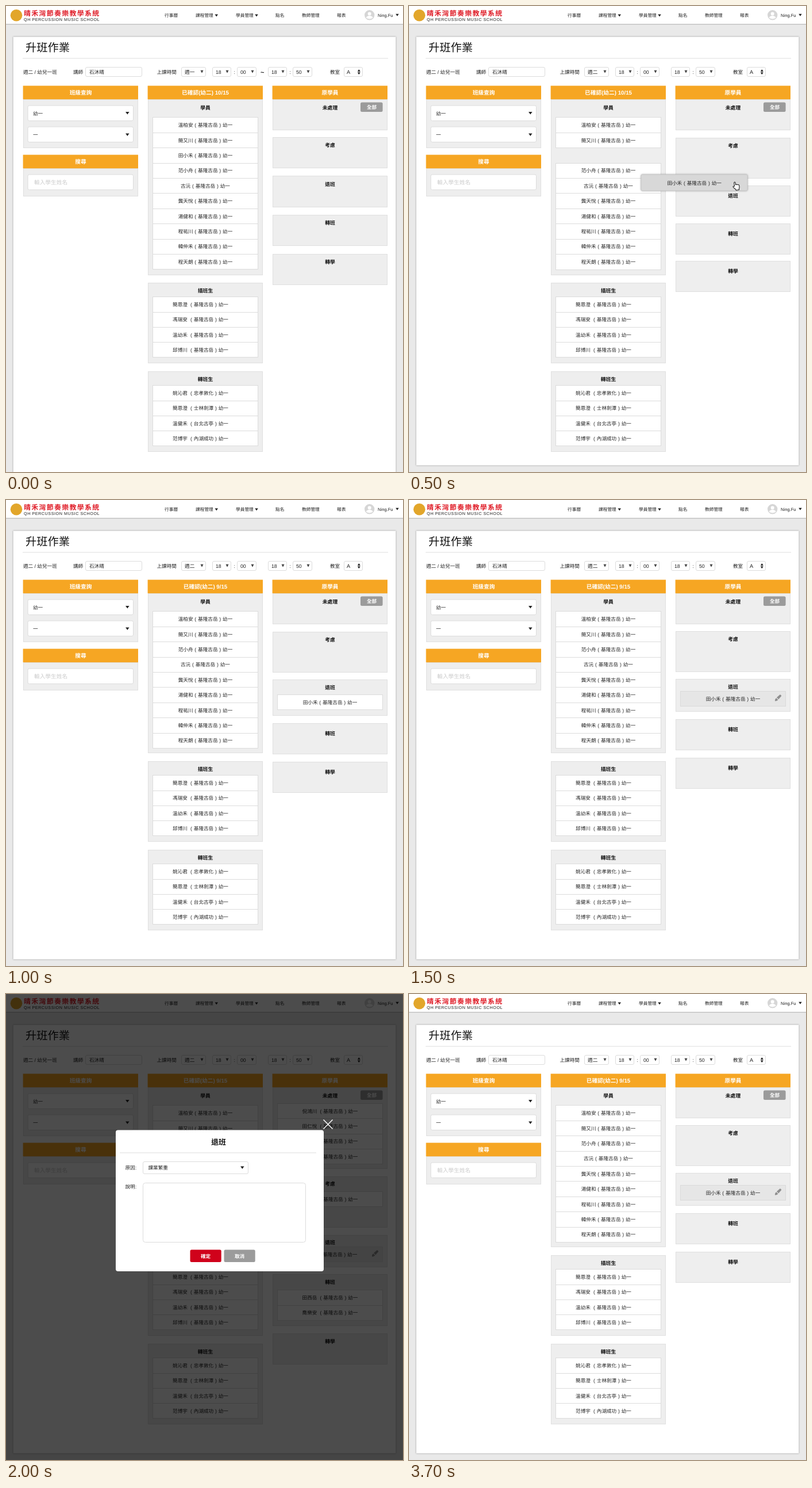
Animation of 691 by 810 pixels, one loop 4500 ms. Source, as an HTML page:

```html
<!DOCTYPE html>
<html lang="zh-TW">
<head>
<meta charset="utf-8">
<title>升班作業</title>
<style>
html, body { margin: 0; width: 100%; height: 100%; overflow: hidden; background: #e9e9e9; }
svg { display: block; width: 100vw; height: 100vh; }
text { font-family: "Liberation Sans", "Noto Sans CJK TC", "Noto Sans CJK", sans-serif; text-rendering: geometricPrecision; white-space: pre; }
.soft { filter: drop-shadow(0 0 1px rgba(0,0,0,.45)); }
.lift { filter: drop-shadow(0 .5px 1.5px rgba(0,0,0,.3)); }
</style>
</head>
<body>
<svg id="stage" viewBox="0 0 691 810" preserveAspectRatio="none"></svg>
<script>
const INK = '#222', LINE = '#dcdcdc', PANEL = '#eee', ORANGE = '#f6a623', GREY = '#9b9b9b';
const COLS = [30, 247, 464];
const BRANCH = '基隆古岳';

// Text is placed by its vertical centre.
function text(x, cy, s, o = {}) {
  const { size = 8.6, fill = INK, weight = 400, anchor = 'start', gap = 0 } = o;
  return `<text x="${x}" y="${cy + size * 0.37}" font-size="${size}" fill="${fill}" font-weight="${weight}" text-anchor="${anchor}" letter-spacing="${gap}">${s}</text>`;
}
const mid = (x, cy, s, o) => text(x, cy, s, { anchor: 'middle', ...o });

const rect = (x, y, w, h, fill, r = 0) =>
  `<rect x="${x}" y="${y}" width="${w}" height="${h}" rx="${r}" fill="${fill}"/>`;

const box = (x, y, w, h, { fill = '#fff', line = LINE, r = 0, cls = '' } = {}) =>
  `<rect class="${cls}" x="${x + 0.5}" y="${y + 0.5}" width="${w - 1}" height="${h - 1}" rx="${r}" fill="${fill}" stroke="${line}"/>`;

const rule = (x1, x2, y, color = '#ddd') => rect(x1, y, x2 - x1, 1, color);

const arrow = (x, y, w = 6.5, h = 4.5, fill = INK) =>
  `<path d="M${x - w / 2} ${y - h / 2}h${w}l${-w / 2} ${h}z" fill="${fill}"/>`;

const panel = (x, y, h) => box(x, y, 200, h, { fill: PANEL, line: '#dfdfdf' });
const heading = (col, cy, s) => mid(COLS[col] + 100, cy, s, { size: 8.8, weight: 700, fill: '#111' });

const bar = (col, y, s) =>
  rect(COLS[col] - 0.4, y - 0.4, 200.4, 23.6, ORANGE) + mid(COLS[col] + 100, y + 11.7, s, { size: 9.7, fill: '#fff', weight: 700 });

function rows(x, y, pitch, names, cx = x + 92) {
  let out = box(x, Math.round(y), 184, Math.round(pitch * names.length) + 1);
  names.forEach((s, i) => {
    if (i) out += rule(x + 1, x + 183, Math.round(y + i * pitch), LINE);
    out += mid(cx, y + (i + 0.5) * pitch + 0.5, s);
  });
  return out;
}

// Third-em spaces centre each bracket in a full-width cell.
const tag = (name, branch = BRANCH) => `${name}\u2004(\u2004${branch}\u2004)\u2004幼一`;
const spaced = (name, branch) => tag(name + ' ', branch);

const MOVED = tag('田小禾');
const CLASS = ['溫柏安', '簡又川', '田小禾', '范小舟', '古沅', '龔天悅', '湯健和', '程祐川', '韓仲禾', '程天朗'].map(n => tag(n));
const JOINED = ['簡恩澄', '馮瑞安', '溫幼禾', '邱博川'].map(n => spaced(n));
const SWITCHED = [['姚沁君', '忠孝敦化'], ['簡恩澄', '士林劍潭'], ['溫健禾', '台北古亭'], ['范博宇', '內湖成功']].map(p => spaced(...p));

function header() {
  const nav = { size: 7.7 };
  const items = [[276, '行事曆'], [330, '課程管理'], [400, '學員管理'], [469, '點名'], [515, '教師管理'], [576, '報表']];
  return rect(0, 32, 691, 1, '#dadada') + rect(0, 0, 691, 31, '#fff') + rule(0, 691, 31, '#c0c0c0')
    + '<circle cx="18" cy="16.3" r="10.3" fill="#e2a62b"/>'
    + text(31, 13, '晴禾灣節奏樂教學系統', { size: 12, weight: 700, fill: '#e0202b', gap: 1.25 })
    + text(31, 23, 'QH PERCUSSION MUSIC SCHOOL', { size: 7.2, fill: '#222', gap: 0.55 })
    + items.map(([x, s]) => text(x, 16.5, s, nav)).join('')
    + arrow(366.3, 16.5, 5.5, 4) + arrow(436, 16.5, 5.5, 4) + arrow(681, 15.7, 5.5, 4)
    + '<circle cx="632.7" cy="15.8" r="8.7" fill="#d6d6d6"/><circle cx="632.7" cy="13.4" r="3" fill="#fff"/>'
    + '<path d="M627 20.8c0-5 11.4-5 11.4 0q-5.7 3.4-11.4 0z" fill="#fff"/>'
    + text(647, 16, 'Ning.Fu', { size: 7.6 });
}

function select(x, w, s) {
  return box(x, 106, w, 17, { r: 2.5 }) + text(x + 6, 114.7, s, { size: 8.7 }) + arrow(x + w - 7, 114.3, 5, 5, '#444');
}

function filters(day, tilde) {
  return text(30, 114.7, '週二 / 幼兒一班') + text(117, 114.7, '講師')
    + box(138, 106, 99, 17, { r: 2.5 }) + text(145, 114.7, '石沐晴')
    + text(262.5, 114.7, '上課時間') + select(305, 43, day)
    + select(359, 33, '18') + text(396.5, 114.7, ':') + select(402, 34, '00')
    + (tilde ? mid(446.3, 114.7, '~', { size: 11, weight: 700 }) : '')
    + select(456, 33, '18') + text(493.5, 114.7, ':') + select(499, 34, '50')
    + text(564, 114.7, '教室') + box(588, 106, 33, 17, { r: 2.5 }) + text(593, 114.7, 'A', { size: 9.2 })
    + arrow(614.3, 117.2, 5, 4) + arrow(614.3, 112, 5, -4);
}

function searchColumn() {
  const field = (y) => box(37.5, y - 0.5, 184.5, 27.5, { r: 2.5 });
  return panel(30, 162, 85) + bar(0, 139, '班級查詢')
    + field(173) + text(47, 186.7, '幼一') + arrow(211.3, 186.3)
    + field(210) + text(47, 224, '一') + arrow(211.3, 223.7)
    + panel(30, 282, 49) + bar(0, 259, '搜尋')
    + field(293) + text(49, 306.7, '輸入學生姓名', { size: 9.7, fill: '#ccc' });
}

function classColumn(mode) {
  const gone = mode === 'gone', dy = gone ? -27 : 0, x = 255, p = 26.4;
  let out = panel(247, 162, gone ? 278 : 306) + bar(1, 139, `已確認(幼二) ${gone ? 9 : 10}/15`) + heading(1, 176.3, '學員');
  if (mode === 'lifted') out += rows(x, 193.4, p, CLASS.slice(0, 2)) + rows(x, 193.4 + 3 * p, p, CLASS.slice(3));
  else out += rows(x, 193.4, p, gone ? CLASS.filter(s => s !== MOVED) : CLASS);
  [['插班生', 481, JOINED], ['轉班生', 635, SWITCHED]].forEach(([s, y, names]) => {
    y += dy;
    out += panel(247, y, 140) + heading(1, y + 13.3, s) + rows(x, y + 24.3, 26.3, names, 338.5);
  });
  return out;
}

function brush(x, y) {
  return `<g transform="translate(${x} ${y}) rotate(45)" fill="#8f8f8f"><path d="M-1.8-7q1.8-1.6 3.6 0l.5 7.6h-4.6z"/><path d="M-2.2 1.7h4.4q.6 3.2-2.2 5.4q-2.8-2.2-2.2-5.4z"/></g>`;
}

// Each section: top, height, heading centre, optional rows.
function statusColumn({ first = 54, waiting, sections, edited }) {
  const names = ['考慮', '退班', '轉班', '轉學'];
  let out = panel(464, 162, first) + bar(2, 139, '原學員') + heading(2, 176.3, '未處理')
    + rect(617, 167.6, 38.6, 16.4, GREY, 2.5) + mid(636.5, 176.3, '全部', { fill: '#fff', weight: 700 });
  if (waiting) out += rows(472, 190, 26.3, waiting);
  sections.forEach(([y, h, cy, list, top], i) => {
    out += panel(464, y, h) + heading(2, cy, names[i]);
    if (list) out += rows(472, top, 26.3, list);
  });
  if (edited) out += box(472, edited, 184, 27, { fill: '#e6e6e6', line: '#dadada' })
    + mid(564, edited + 14, MOVED) + brush(642, edited + 12.5);
  return out;
}

function dragged() {
  return box(403.5, 292.5, 186, 29, { fill: '#d8d8d8', line: '#c6c6c6', r: 2, cls: 'lift' }) + mid(496.7, 307.5, MOVED)
    + '<path transform="translate(563 305) rotate(-8 6 7)" d="M3.4 8V1.7q1.2-1.7 2.3 0V5.6q1.2-1 2 .3 1.3-.8 2 .4 1.6-.5 1.9 1V10q0 2-1.2 3.6v1.6H4.9v-1.3L1.2 9.7Q.1 7.7 2 7.7z" fill="#fff" stroke="#111" stroke-width="1" stroke-linejoin="round"/>';
}

function dialog() {
  const button = (x, s, fill) => rect(x, 444.6, 54.2, 21.5, fill, 2.5) + mid(x + 27, 456, s, { fill: '#fff', weight: 700 });
  return rect(0, 0, 691, 810, 'rgba(0,0,0,.7)')
    + '<path d="M552.5 218.5l16 16m0-16l-16 16" stroke="#fff" stroke-width="1.5"/>'
    + rect(191, 236.5, 362, 245.5, '#fff', 4)
    + mid(370, 257.5, '退班', { size: 12.8, weight: 700, fill: '#111' }) + rule(198, 540, 275.5)
    + text(207.5, 302, '原因:') + box(238, 291, 184, 22, { r: 2.5 }) + text(247.5, 302.2, '課業繁重') + arrow(411.3, 301.7)
    + text(207.5, 334.7, '說明:') + box(238, 328, 284, 104, { r: 4 })
    + button(320.5, '確定', '#d0021b') + button(379.5, '取消', GREY);
}

function scene({ tall, day = '週二', tilde, mode, status, top = '' }) {
  return rect(0, 0, 691, 810, '#e9e9e9')
    + '<g class="soft">' + rect(12.5, 53.5, 666, tall ? 800 : 745, '#fff') + '</g>' + header()
    + text(34, 71.5, '升班作業', { size: 19.3, weight: 300, fill: '#111' }) + rule(29, 665, 90.5)
    + filters(day, tilde) + searchColumn() + classColumn(mode) + statusColumn(status) + top;
}

const settled = { edited: 332, sections: [[228, 71, 242], [311, 57, 325], [381, 54, 398.7], [448, 54, 465.7]] };

const busy = {
  first: 142, edited: 439,
  waiting: ['倪鴻川', '田仁悅', '喬又安', '柯沐川'].map(n => spaced(n)),
  sections: [[317, 89, 329.7, [spaced('倪語禾')], 343], [419, 56, 432], [487, 90, 501, ['田西岳', '喬樂安'].map(n => spaced(n)), 514.3], [590, 54, 603.5]]
};

const scenes = {
  start: { tall: true, day: '週一', tilde: true, mode: 'full',
    status: { sections: [[228, 54, 241.7], [295, 55, 309.3], [363, 54, 376.8], [431, 54, 444.7]] } },
  drag: { mode: 'lifted', top: dragged(),
    status: { sections: [[229, 71, 243], [312, 54, 329.5], [378, 54, 396], [443, 54, 461]] } },
  drop: { mode: 'gone',
    status: { sections: [[229, 71, 243], [312, 63, 325.3, [MOVED], 338], [388, 54, 405.7], [455, 54, 472.7]] } },
  hover: { mode: 'gone', status: settled },
  modal: { mode: 'gone', status: busy, top: dialog() }
};

const LOOP = 4500;
const steps = [[0, 'start'], [500, 'drag'], [1000, 'drop'], [1500, 'hover'], [2000, 'modal'], [2500, 'hover']];

const stage = document.getElementById('stage');
stage.innerHTML = Object.entries(scenes).map(([id, s]) => `<g id="${id}" display="none">${scene(s)}</g>`).join('');

const begin = performance.now();
let shown = null;
function draw() {
  const t = (performance.now() - begin) % LOOP;
  const name = steps.filter(([at]) => at <= t).pop()[1];
  if (name !== shown) {
    for (const g of stage.children) g.setAttribute('display', g.id === name ? 'inline' : 'none');
    shown = name;
  }
  requestAnimationFrame(draw);
}
draw();
</script>
</body>
</html>
```
